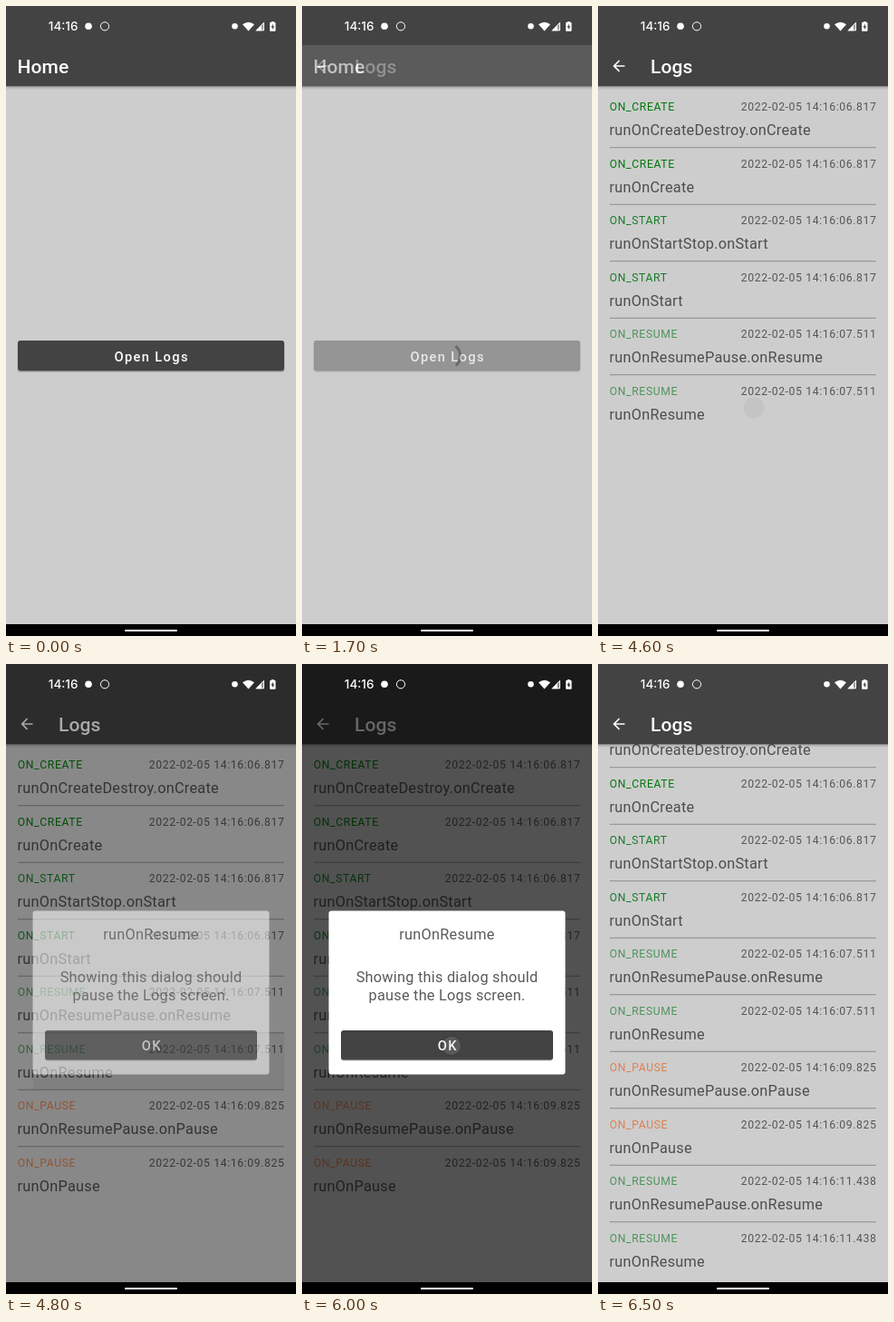
Write an HTML page that moves like this. It is 320 px wide and 693 px high and loops after 8 s.

```html
<!DOCTYPE html>
<html lang="en">
<head>
<meta charset="utf-8">
<title>Lifecycle logs</title>
<style>
  html, body { margin: 0; width: 100%; height: 100%; overflow: hidden; background: #000; }
  svg { display: block; width: 100%; height: 100%; font-family: Roboto, sans-serif; }
  .title { font-size: 21px; font-weight: 500; letter-spacing: .1px; fill: #fff; }
  .meta { font-size: 12.2px; letter-spacing: .62px; }
  .stamp { fill: #565656; text-anchor: end; }
  .name { font-size: 16.3px; letter-spacing: .25px; fill: #4e4e4e; }
  .button { font-size: 14.67px; font-weight: 500; letter-spacing: 1.35px; fill: #fff; text-anchor: middle; }
  .mid { text-anchor: middle; fill: #5a5a5a; }
  .clock { font: 500 13.5px Inter, Roboto, sans-serif; fill: #fff; }
</style>
</head>
<body>
<svg viewBox="0 0 320 693" preserveAspectRatio="none">
  <defs>
    <linearGradient id="shade" x2="0" y2="1">
      <stop offset="0" stop-opacity=".22"/>
      <stop offset="1" stop-opacity="0"/>
    </linearGradient>
    <clipPath id="body"><rect y="88" width="320" height="592"/></clipPath>
    <clipPath id="openShape"><rect x="13" y="368" width="294" height="33" rx="3"/></clipPath>
    <clipPath id="okShape"><rect x="43" y="403" width="234" height="32.5" rx="3"/></clipPath>
    <clipPath id="rowShape"><rect x="13" y="406" width="294" height="62"/></clipPath>
    <g id="bar">
      <rect y="88" width="320" height="4" fill="url(#shade)"/>
      <rect y="43" width="320" height="45.3" fill="#434343"/>
    </g>
  </defs>

  <rect width="320" height="680" fill="#cdcdcd"/>
  <rect width="320" height="43" fill="#434343"/>

  <g id="logs">
    <g clip-path="url(#body)">
      <path id="spinner" fill="none" stroke="#434343" stroke-width="3.3"/>
      <g id="list"></g>
      <g clip-path="url(#rowShape)"><circle id="rowRipple" cx="172" cy="442"/></g>
    </g>
    <use href="#bar"/>
    <path transform="translate(13.2 56.2) scale(.815)" fill="#fff"
      d="M20 11H7.83l5.59-5.59L12 4l-8 8 8 8 1.41-1.41L7.83 13H20z"/>
    <text class="title" x="58" y="74">Logs</text>
  </g>

  <g id="home">
    <use href="#bar"/>
    <text class="title" x="12.5" y="74">Home</text>
    <rect x="12.5" y="368.5" width="295" height="34.5" rx="3.5" opacity=".14"/>
    <rect x="13" y="369" width="294" height="33" rx="3" opacity=".25"/>
    <rect x="13" y="368" width="294" height="33" rx="3" fill="#434343"/>
    <g clip-path="url(#openShape)"><circle id="openRipple" cx="165" cy="388" fill="#fff"/></g>
    <text class="button" x="160.7" y="390.5">Open Logs</text>
  </g>

  <rect id="scrim" width="320" height="680"/>

  <g id="dialog">
    <rect x="29.5" y="271.5" width="261" height="180" rx="3" fill="#fff"/>
    <text class="name mid" x="160" y="303">runOnResume</text>
    <text class="name mid" x="160" y="350">Showing this dialog should</text>
    <text class="name mid" x="160" y="370">pause the Logs screen.</text>
    <rect x="43" y="404" width="234" height="32.5" rx="3" opacity=".25"/>
    <rect x="43" y="403" width="234" height="32.5" rx="3" fill="#434343"/>
    <g clip-path="url(#okShape)"><circle id="okRipple" cx="165" cy="420" fill="#fff"/></g>
    <text class="button" x="160.7" y="424.7">OK</text>
  </g>

  <circle id="touch" r="11.5"/>

  <g fill="#fff">
    <text class="clock" x="46.8" y="27.3">14:16</text>
    <circle cx="91" cy="22.3" r="3.8"/>
    <circle cx="109" cy="22.3" r="4.6" fill="none" stroke="#fff" stroke-width="1"/>
    <circle cx="252.5" cy="22.3" r="3.3"/>
    <path d="M261 20.2Q267.5 15.2 274 20.2L267.5 27.6Z"/>
    <path d="M275.3 27.2L285 17.4V27.2Z" opacity=".45"/>
    <path d="M275.3 27.2L281.8 20.7V27.2Z"/>
    <path d="M284.4 18.4V26.7H276.6Z" fill="none" stroke="#fff"/>
    <path fill-rule="evenodd" d="M292.8 18V17h2.9v1h1.1q.7 0 .7.7v8.4q0 .7-.7.7h-5q-.7 0-.7-.7v-8.4q0-.7.7-.7z
      M294.8 19.8l-2.4 3.6h1.5v2.7l2.4-3.7h-1.5z"/>
  </g>

  <rect y="680" width="320" height="13"/>
  <rect x="131" y="686" width="58" height="2" rx="1" fill="#fff"/>
</svg>

<script>
const LOOP = 8000;
const PITCH = 62.5;
const MAX_SCROLL = 42;
const COLORS = { CREATE: '#007a0c', START: '#187c2a', RESUME: '#4b955a', PAUSE: '#df8050' };

// Each step logs a paired and a plain callback.
const STEPS = [
  { event: 'CREATE', pair: 'CreateDestroy', stamp: '06.817', at: 0 },
  { event: 'START', pair: 'StartStop', stamp: '06.817', at: 0 },
  { event: 'RESUME', pair: 'ResumePause', stamp: '07.511', at: 0 },
  { event: 'PAUSE', pair: 'ResumePause', stamp: '09.825', at: 4750 },
  { event: 'RESUME', pair: 'ResumePause', stamp: '11.438', at: 6150 }
];

const el = id => document.getElementById(id);
const set = (node, attrs) => { for (const k in attrs) node.setAttribute(k, attrs[k]); };
const ramp = (t, from, to) => Math.min(1, Math.max(0, (t - from) / (to - from)));

function make(tag, parent, attrs, text = '') {
  const node = document.createElementNS('http://www.w3.org/2000/svg', tag);
  set(node, attrs);
  node.textContent = text;
  return parent.appendChild(node);
}

// cubic-bezier(.4, 0, .2, 1)
function ease(x) {
  let lo = 0, hi = 1;
  for (let i = 0; i < 20; i++) {
    const s = (lo + hi) / 2;
    const bx = 1.2 * s * (1 - s) ** 2 + 0.6 * s * s * (1 - s) + s ** 3;
    if (bx < x) lo = s; else hi = s;
  }
  return lo * lo * (3 - 2 * lo);
}

const list = el('list');
const rows = [];

function addRow({ event, stamp, at }, name) {
  const y = 88 + rows.length * PITCH;
  const g = make('g', list, {});
  if (rows.length) make('rect', g, { x: 13, y: y + 4.8, width: 294, height: 0.9, fill: '#858585' });
  make('text', g, { class: 'meta', x: 12.8, y: y + 27.3, fill: COLORS[event] }, 'ON_' + event);
  make('text', g, { class: 'meta stamp', x: 307.4, y: y + 27.3 }, '2022-02-05 14:16:' + stamp);
  make('text', g, { class: 'name', x: 12.6, y: y + 54 }, name);
  rows.push({ g, at });
}

for (const step of STEPS) {
  const call = step.event[0] + step.event.slice(1).toLowerCase();
  addRow(step, `runOn${step.pair}.on${call}`);
  addRow(step, `runOn${call}`);
}

function ripple(id, t, start, grow, alpha, fadeFrom, fadeTo) {
  set(el(id), {
    r: 10 + 150 * ease(ramp(t, start, start + grow)),
    opacity: t < start ? 0 : alpha * (1 - ramp(t, fadeFrom, fadeTo))
  });
}

function spinnerPath(t) {
  const age = Math.max(0, t - 1510);
  const phase = age % 1332;
  const base = -90 + 286 * phase / 1332 + 216 * Math.floor(age / 1332);
  const head = base + 290 * ease(ramp(phase, 0, 666));
  const tail = base + 290 * ease(ramp(phase, 666, 1332));
  const point = deg => {
    const a = deg * Math.PI / 180;
    return `${160 + 14.5 * Math.cos(a)} ${385 + 14.5 * Math.sin(a)}`;
  };
  return `M${point(tail)}A14.5 14.5 0 ${head - tail > 180 ? 1 : 0} 1 ${point(head)}`;
}

const TAPS = [[1200, 1400, 165, 388], [4600, 4750, 172, 442], [6000, 6100, 165, 420]];

function draw(t) {
  // Home cross-fades to Logs
  set(el('home'), { opacity: 1 - ease(ramp(t, 1500, 2100)) });
  set(el('logs'), { opacity: ease(ramp(t, 1460, 2060)) });
  ripple('openRipple', t, 1220, 300, 0.18, 2000, 2100);

  // Loading, then the list
  const shown = ease(ramp(t, 2080, 2380));
  set(el('spinner'), { d: spinnerPath(t), opacity: 1 - shown });
  const scroll = MAX_SCROLL * ease(ramp(t, 6220, 6490));
  set(list, { opacity: shown, transform: `translate(0 ${-scroll})` });
  for (const { g, at } of rows) set(g, { visibility: t >= at ? 'visible' : 'hidden' });
  ripple('rowRipple', t, 4640, 260, 0.06, 4900, 5350);

  // Dialog
  set(el('scrim'), { opacity: 0.6 * (ramp(t, 4700, 4880) - ramp(t, 6130, 6340)) });
  set(el('dialog'), { opacity: ramp(t, 4720, 4870) - ramp(t, 6080, 6230) });
  ripple('okRipple', t, 6000, 200, 0.15, 6200, 6300);

  const tap = TAPS.find(([from, to]) => t >= from && t < to);
  set(el('touch'), tap ? { cx: tap[2], cy: tap[3], opacity: 0.045 } : { opacity: 0 });
}

const start = performance.now();
function tick() {
  draw((performance.now() - start) % LOOP);
  requestAnimationFrame(tick);
}
tick();
</script>
</body>
</html>
```
